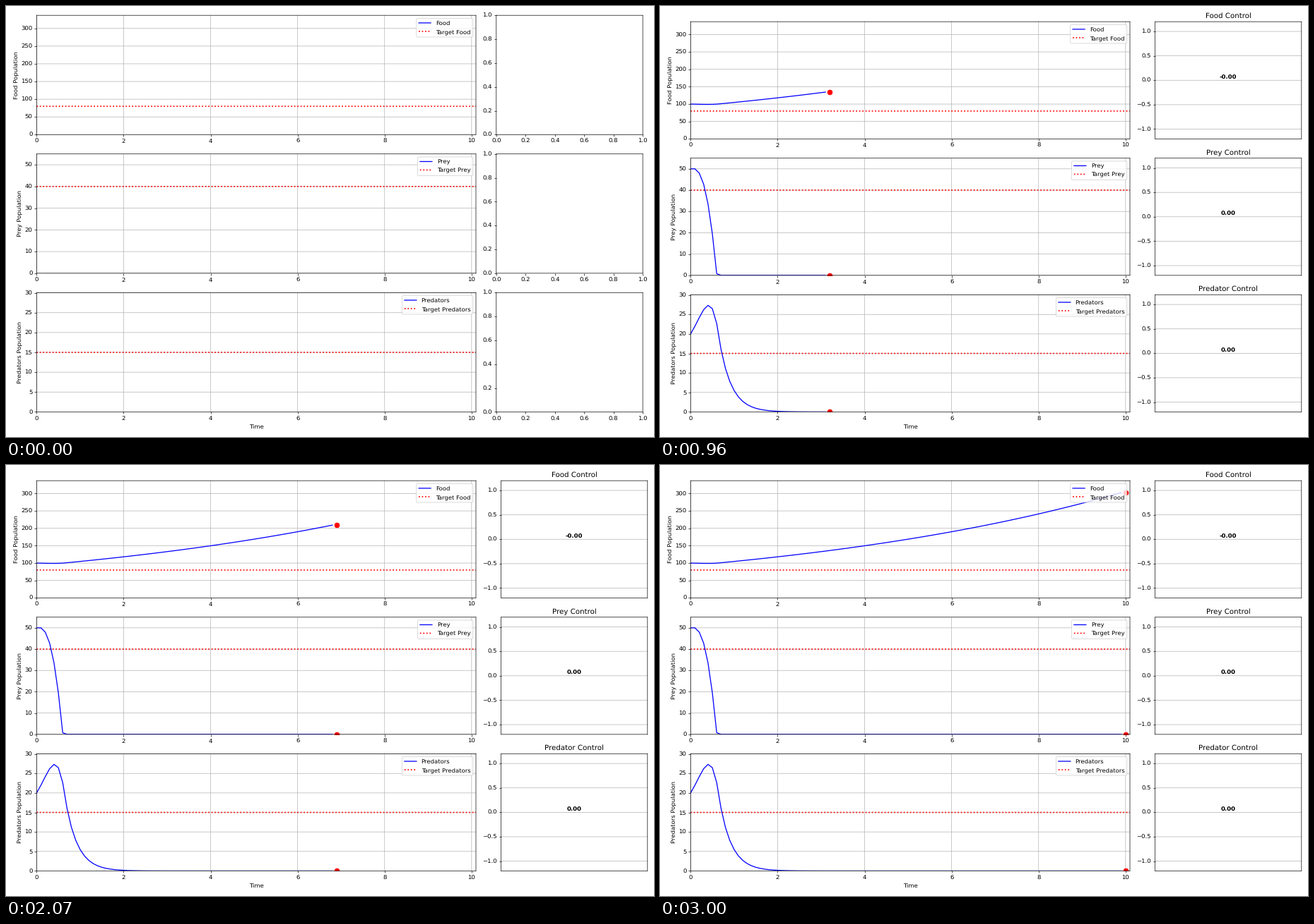
Recreate the animation shown at these times as a matplotlib script. Size 917 by 611 pixels, loop 3030 ms.

```python
import matplotlib.pyplot as plt
import numpy as np
from matplotlib.animation import FuncAnimation

W, H = 917, 611
DPI = 61.125
STEPS, DT = 101, 0.1
BOTTOM, GAP = 575.4, 27.4

plt.rcParams.update({
    "font.family": "DejaVu Sans",
    "text.hinting": "none",
    "path.snap": False,
})


def simulate():
    """Euler steps of a food / prey / predator chain."""
    food, prey, pred = 100.0, 50.0, 20.0
    rows = []
    for _ in range(STEPS):
        rows.append((food, prey, pred))
        d_food = 0.12 * food - 0.3 * prey
        d_prey = 0.04 * food * prey - 10 * pred
        d_pred = 0.08 * prey * pred - 3 * pred
        food = max(food + DT * d_food, 0)
        prey = max(prey + DT * d_prey, 0)
        pred = max(pred + DT * d_pred, 0)
    return np.array(rows).T


def cell(row, left, right, top):
    """Figure-fraction box of one of three stacked rows, given in pixels."""
    height = (BOTTOM - top - 2 * GAP) / 3
    base = top + row * (height + GAP) + height
    return [left / W, 1 - base / H, (right - left) / W, height / H]


def start_cell(row, left, right):
    return cell(row, left, right, 13.2)


def run_cell(row, left, right):
    return cell(row, left, right, 22.2)


class Panel:
    def __init__(self, fig, row, name, title, target, values):
        self.row, self.target, self.values = row, target, values

        self.ax = ax = fig.add_axes(start_cell(row, 43.3, 665.1))
        self.line, = ax.plot([], [], "b-", label=name)
        ax.axhline(target, color="r", ls=":", lw=2, label=f"Target {name}")
        self.dot, = ax.plot([], [], "ro", ms=8)
        ax.set(xlim=(0, STEPS * DT), ylim=(0, 1.1 * values.max()),
               ylabel=f"{name} Population")
        if row == 2:
            ax.set_xlabel("Time")
        ax.grid(True)
        ax.legend(loc="upper right")

        self.blank = fig.add_axes(start_cell(row, 693.8, 901.1))

        self.control = ctl = fig.add_axes(run_cell(row, 700.6, 907.8))
        ctl.set(xlim=(-0.5, 0.5), ylim=(-1.2, 1.2), xticks=[],
                yticks=[-1, -0.5, 0, 0.5, 1])
        ctl.set_title(title)
        ctl.grid(True)
        self.label = ctl.text(0, 0, "", ha="center", va="bottom",
                              fontweight="bold")

    def show(self, k):
        running = k > 0
        self.blank.set_visible(not running)
        self.control.set_visible(running)
        place = run_cell if running else start_cell
        self.ax.set_position(place(self.row, 43.3, 665.0))
        self.line.set_data(times[:k], self.values[:k])
        if running:
            last = self.values[k - 1]
            self.dot.set_data([times[k]], [last])
            self.label.set_text("-0.00" if last > self.target else "0.00")
        else:
            self.dot.set_data([], [])


times = np.arange(STEPS) * DT
food, prey, predators = simulate()

# The small surplus guards against truncation of the pixel size.
fig = plt.figure(figsize=((W + 0.001) / DPI, (H + 0.001) / DPI), dpi=DPI)
panels = [
    Panel(fig, 0, "Food", "Food Control", 80, food),
    Panel(fig, 1, "Prey", "Prey Control", 40, prey),
    Panel(fig, 2, "Predators", "Predator Control", 15, predators),
]


def update(k):
    for panel in panels:
        panel.show(k)
    return []


anim = FuncAnimation(fig, update, frames=STEPS, interval=30, repeat=True,
                     repeat_delay=0, blit=False)
plt.show()
```
